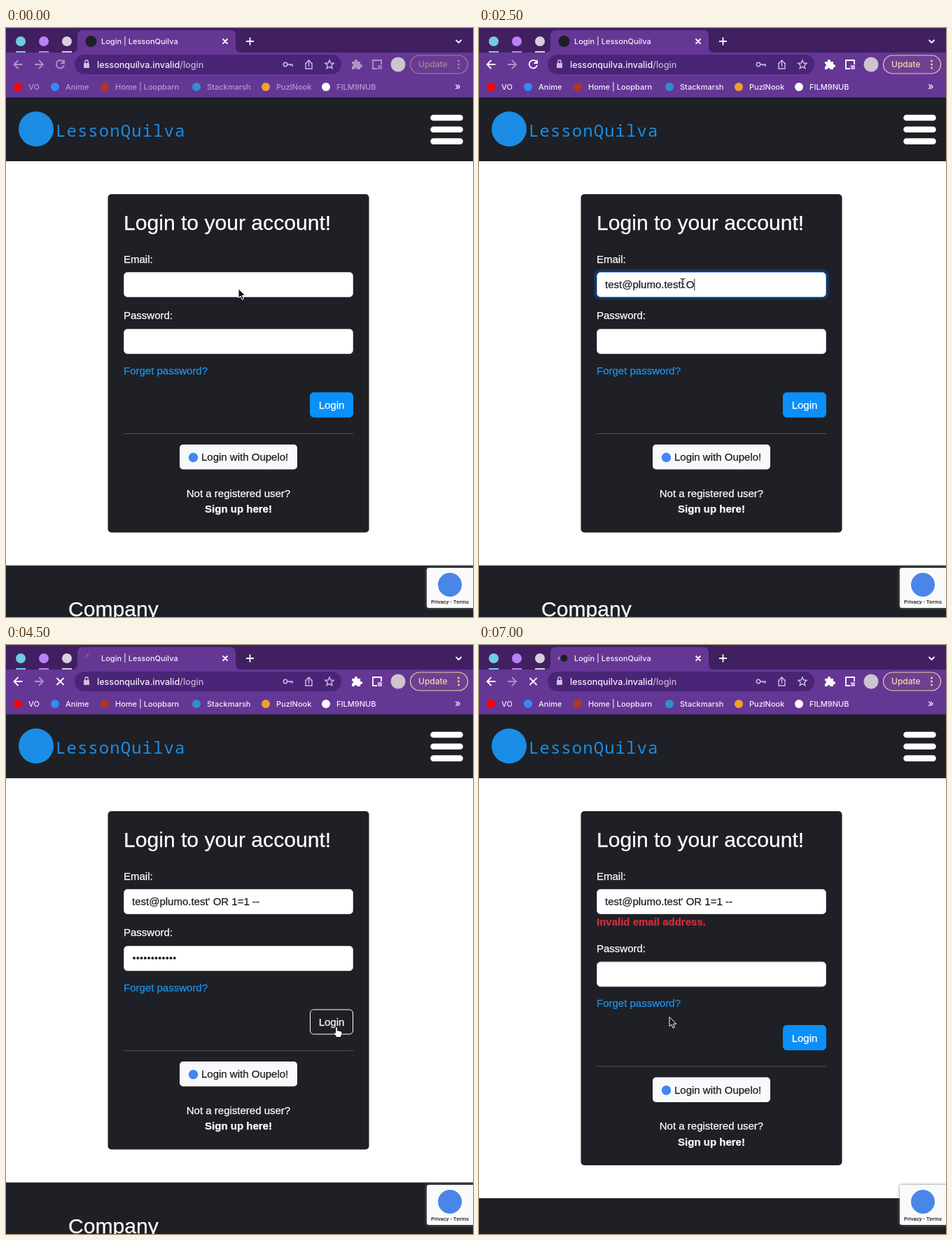
These frames come from a looping animation (667 px wide and 840 px high, 7100 ms). An HTML page:

```html
<!DOCTYPE html>
<html lang="en">
<head>
<meta charset="utf-8">
<title>Login</title>
<style>
  html, body { margin: 0; width: 100%; height: 100%; overflow: hidden; background: #fff; }
  #stage { position: relative; width: 667px; height: 840px; overflow: hidden; }
  svg { display: block; }
  text { white-space: pre; }
  .ui { font: 500 11px Inter, sans-serif; fill: #f4eefa; }
  .url { font-size: 12.6px; }
  .page { font: 15px "Liberation Sans", Arial, sans-serif; color: #fff; fill: currentColor; }
  .page text { stroke: currentColor; stroke-width: .25; }
  .page .big { font-size: 30.1px; }
  .bold { font-weight: 700; }
  .ink { color: #1b1d20; }
  .link { color: #1d93ee; }
  .error { color: #cf2e3f; }
  .mid { text-anchor: middle; }
  .brand { font: 500 24px "Noto Sans Mono", monospace; letter-spacing: 1.05px; fill: #1b8de4; }
  .dark { fill: #1e2025; }
  .line { fill: none; stroke: #fff; stroke-width: 1.8; }
  .soft { stroke: #d0bfe0; stroke-width: 1.4; }
  .field .box { fill: #fff; stroke: #c3c8ce; }
  .field .glow { fill: none; stroke: #1a345b; stroke-width: 3.8; }
  .field.on .box { stroke: #86b7fe; }
  #caret { stroke: #222; stroke-width: 1; }
  #badge {
    position: absolute; left: 601px; top: 770px; width: 70px; height: 57px;
    border-radius: 3px; box-shadow: 0 0 4px #808080;
  }
  #badge.full { background: #fafafa; }
  #badge:not(.full) > * { display: none; }
  #badge i { position: absolute; left: 16px; top: 7px; width: 34px; height: 34px; border-radius: 50%; background: #4a86e8; }
  #badge span {
    position: absolute; left: 0; top: 44px; width: 66px; text-align: center; white-space: nowrap;
    font: 500 7.8px/10px Roboto, sans-serif; color: #222;
  }
</style>
</head>
<body>
<div id="stage">
<svg width="667" height="840" viewBox="0 0 667 840">
  <rect width="667" height="840" fill="#fff"/>

  <!-- browser -->
  <rect width="667" height="36" fill="#402060"/>
  <rect y="35" width="667" height="65" fill="#643795"/>
  <path d="M94 35q8 0 8-8V11q0-8 8-8h210q8 0 8 8v16q0 8 8 8z" fill="#643795"/>
  <g id="lights"></g>
  <circle id="icon" cx="121.500" cy="19" fill="#1e2025"/>
  <circle id="spin" cx="120.500" cy="19" r="6.500" fill="none" pathLength="360"/>
  <text class="ui" x="136" y="23">Login | LessonQuilva</text>
  <path class="line" d="M309.500 15.500l7 7m0-7l-7 7M343 19h11m-5.500-5.500v11M642.500 17l4 4 4-4"/>

  <rect x="98" y="38" width="381" height="28" rx="14" fill="#4a2477"/>
  <g id="nav">
    <path class="line" d="M23.500 52H11.500m6-6l-6 6 6 6"/>
    <path id="reload" class="line" d="M82.200 48.500A5.700 5.700 0 1 0 83 53M83 45.500v4.500h-4.500"/>
    <path id="stop" class="line" d="M72.500 47l10 10m0-10l-10 10"/>
    <path d="M494 48h4a2.200 2.200 0 1 1 4 0h4v4a2.200 2.200 0 1 1 0 4v3h-4.500a2 2 0 0 0-4 0H494v-4a2 2 0 0 0 0-4z" fill="#fff"/>
    <path class="line" d="M536 52v-6h-12v12h6"/>
    <rect x="531" y="53" width="6" height="6" fill="#d9a4ee"/>
  </g>
  <path class="line" opacity=".45" d="M41 52h12m-6-6l6 6-6 6"/>
  <rect x="111" y="50" width="8" height="7" rx="1" fill="#d0bfe0"/>
  <path class="line soft" d="M112.800 50v-2a2.200 2.200 0 0 1 4.400 0v2"/>
  <text class="ui url" x="130" y="56.500">lessonquilva.invalid<tspan fill="#c3b0d6">/login</tspan></text>
  <g class="line soft">
    <circle cx="399" cy="52" r="2.700"/>
    <path d="M402 52h7v3m-3-3v2"/>
    <path d="M430 50h-2v8h9v-8h-2m-2.500 5v-9m-3 3l3-3 3 3"/>
    <path d="M462 46l1.800 4 4.300.4-3.300 2.900 1 4.300-3.800-2.300-3.800 2.300 1-4.300-3.300-2.900 4.300-.4z"/>
  </g>
  <circle cx="560" cy="52" r="10.500" fill="#cfc5cc"/>
  <g id="update">
    <rect x="577.500" y="39" width="82" height="26" rx="13" fill="#6d4092" stroke="#e9cf9f" stroke-width="1.200"/>
    <text class="ui" x="589" y="56.300" style="font-size:12px;fill:#f3d9a8">Update</text>
    <path d="M646.500 47v.01m0 5v.01m0 5v.01" stroke="#f3d9a8" stroke-width="2.800" stroke-linecap="round"/>
  </g>
  <g id="marks"></g>
  <text class="ui" x="641" y="87.500" style="font-size:14px">»</text>

  <!-- page header -->
  <rect class="dark" y="99" width="667" height="91"/>
  <circle cx="43" cy="144" r="25" fill="#1b8de4"/>
  <text class="brand" x="71" y="155">LessonQuilva</text>
  <path d="M610.500 128h38m-38 16.800h38m-38 16.800h38" stroke="#fff" stroke-width="8.600" stroke-linecap="round"/>

  <!-- login card -->
  <rect id="card" class="dark" x="145.500" y="237" width="373" rx="5"/>
  <g class="page">
    <text class="big" x="168" y="287.500">Login to your account!</text>
    <text x="168" y="334.500">Email:</text>
    <g id="email" class="field">
      <rect class="glow" x="166" y="346" width="332" height="39.500" rx="7"/>
      <rect class="box" x="168.500" y="348.500" width="327" height="35" rx="5"/>
      <text id="typed" class="ink" x="180" y="371"></text>
    </g>
    <text id="error" class="bold error" x="168" y="400">Invalid email address.</text>
    <g id="lower">
      <text x="168" y="415">Password:</text>
      <g id="pass" class="field">
        <rect class="glow" x="166" y="427" width="332" height="39.500" rx="7"/>
        <rect class="box" x="168.500" y="429.500" width="327" height="35" rx="5"/>
        <g id="dots" class="ink"></g>
      </g>
      <text class="link" x="168" y="493.500">Forget password?</text>
      <rect id="button" x="434.500" y="520" width="61" height="35" rx="5"/>
      <text class="mid" x="465" y="543">Login</text>
      <path d="M168 578.500h328" stroke="#505257"/>
      <rect x="248" y="594" width="168" height="35.500" rx="5" fill="#f8f9fa"/>
      <circle cx="267.500" cy="612.500" r="6.700" fill="#4285f4"/>
      <text class="ink" x="279" y="617">Login with Oupelo!</text>
      <text class="mid" x="332" y="668.500">Not a registered user?</text>
      <text class="mid bold" x="332" y="691">Sign up here!</text>
      <rect class="dark" y="766.500" width="667" height="90"/>
      <text class="big" x="89" y="839">Company</text>
    </g>
  </g>
  <path id="caret"/>

  <g id="pointer" stroke-linejoin="round" stroke-linecap="round">
    <path id="arrow" d="M0 0v13l3-2.800 2.200 5 2.300-1-2.200-4.800h4.200z" fill="#111" stroke="#fff"/>
    <g id="beam" fill="none">
      <path d="M-3-6.500q3 0 3 2v9q0 2-3 2M3-6.500q-3 0-3 2v9q0 2 3 2M-1.500 1h3" stroke="#fff" stroke-width="2.600"/>
      <path d="M-3-6.500q3 0 3 2v9q0 2-3 2M3-6.500q-3 0-3 2v9q0 2 3 2M-1.500 1h3" stroke="#111" stroke-width="1.200"/>
    </g>
    <path id="hand" d="M-1.500 8V1.200a1.500 1.500 0 0 1 3 0V5l1-.3 1.500.8 1.300-.2 1 .9 1.200.2.500 1.200v3l-1.500 2.400v1.500H.500L-3.500 9.800q-1.500-2 .3-2.300z" fill="#fff" stroke="#111"/>
  </g>
</svg>
<div id="badge"><i></i><span>Privacy - Terms</span></div>
</div>

<script>
const LOOP = 7100, STEP = 100;
const ACTIVE = 1600, TYPE = 1800, PASS = 2800, HOVER = 3900, CLICK = 4200, LOADING = 4400,
      RELOAD = 5000, ICON_BACK = 5700, BADGE_BOX = 6200, BADGE_FULL = 6600, LATE = 6700;
const EMAIL = "test@plumo.test' OR 1=1 --";
const SHIFT = 22.5, FADE = 200;

// time, x, y
const PATH = [
  [0, 332, 372], [500, 332, 372], [1400, 291, 364], [2900, 291, 364], [3300, 479, 496],
  [HOVER, 472, 545], [5300, 472, 545], [5700, 330, 400], [6000, 250, 392],
  [6300, 132, 333], [6600, 165, 400], [7000, 272, 531]
];
const SHAPES = [
  [0, "arrow"], [ACTIVE, "beam"], [3000, "arrow"], [HOVER, "hand"],
  [5400, "arrow"], [5600, "beam"], [6500, "arrow"]
];
// icon x, icon colour, label
const MARKS = [
  [17, "#f00", "VO"], [70, "#2f8df5", "Anime"], [141, "#b1361e", "Home | Loopbarn"],
  [272, "#2f8fd0", "Stackmarsh"], [371, "#f0a12b", "PuzlNook"], [457, "#fff", "FILM9NUB"]
];

const $ = id => document.getElementById(id);
const set = (id, attrs) => { for (const k in attrs) $(id).setAttribute(k, attrs[k]); };
const show = (id, on) => { $(id).style.display = on ? "" : "none"; };
const clamp = (v, lo, hi) => Math.max(lo, Math.min(hi, v));

$("lights").innerHTML = ["#70cce2", "#bb80f5", "#d6d0dc"].map((c, i) => {
  const x = 21 + 33 * i;
  return `<circle cx="${x}" cy="19" r="7" fill="${c}"/><path d="M${x - 7} 34h14" stroke="${c}" stroke-width="2"/>`;
}).join("");
$("marks").innerHTML = MARKS.map(([x, c, label]) =>
  `<circle cx="${x}" cy="84" r="6" fill="${c}"/><text class="ui" x="${x + 15}" y="87.5">${label}</text>`
).join("");
$("dots").innerHTML = Array.from({ length: 12 }, (_, i) =>
  `<circle cx="${183 + 5.25 * i}" cy="446.5" r="1.9"/>`).join("");

function pointAt(t) {
  const i = Math.max(1, PATH.findIndex(p => p[0] >= t));
  const [t0, x0, y0] = PATH[i - 1], [t1, x1, y1] = PATH[i];
  const u = (t - t0) / (t1 - t0), e = u * u * (3 - 2 * u);
  return [x0 + (x1 - x0) * e, y0 + (y1 - y0) * e];
}

function drawTab(t) {
  const loading = t >= LOADING;
  show("reload", !loading);
  show("stop", loading);
  show("icon", !loading || t >= ICON_BACK);
  set("icon", { r: loading ? 5 : 8 });
  show("spin", loading);
  if (!loading) return;
  const wait = t < RELOAD, late = t >= LATE;
  const arc = wait ? 55 : late ? 35 : t >= ICON_BACK ? 290 : 240;
  const turn = wait ? 195 - (t - 4500) * 0.36
    : late ? 165 + (t - 7000) * 0.36
    : 60 + (t - 5200) * 0.36;
  set("spin", {
    stroke: wait ? "#8f6bb5" : "#c58bd8",
    "stroke-width": wait ? 1.2 : 2.2,
    "stroke-dasharray": `${arc} ${360 - arc}`,
    transform: `rotate(${turn} 120.5 19)`
  });
}

function focus(id, t, from, to) {
  const on = t >= from && t < to, field = $(id);
  field.classList.toggle("on", on);
  field.querySelector(".glow").style.opacity = on ? clamp((t - from) / FADE, 0, 1) : 0;
  return on;
}

function drawForm(t) {
  const reloaded = t >= RELOAD;
  const chars = clamp(Math.floor((t - TYPE) / 38), 0, EMAIL.length);
  const dots = reloaded ? 0 : clamp(Math.floor((t - PASS) / 55), 0, 12);
  const onEmail = focus("email", t, ACTIVE, PASS), onPass = focus("pass", t, PASS, CLICK);
  const hover = t >= HOVER && !reloaded;

  $("typed").textContent = EMAIL.slice(0, chars);
  [...$("dots").children].forEach((d, i) => { d.style.display = i < dots ? "" : "none"; });

  show("caret", onEmail || onPass);
  const cx = onPass ? 180.5 + 5.25 * dots : 180.5 + (chars ? $("typed").getComputedTextLength() : 0);
  set("caret", { d: `M${cx} ${onPass ? 438 : 357.5}v17` });

  show("error", reloaded);
  set("lower", { transform: `translate(0 ${reloaded ? SHIFT : 0})` });
  set("card", { height: 482.5 + (reloaded ? SHIFT : 0) });
  set("button", { fill: hover ? "none" : "#0b8ff9", stroke: hover ? "#fff" : "#0b8ff9" });
}

function render(t) {
  const active = t >= ACTIVE;
  for (const id of ["nav", "update"]) set(id, { opacity: active ? 1 : 0.48 });
  for (const label of $("marks").querySelectorAll("text")) label.style.opacity = active ? 1 : 0.55;

  drawTab(t);
  drawForm(t);

  show("badge", t < RELOAD || t >= BADGE_BOX);
  $("badge").classList.toggle("full", t < RELOAD || t >= BADGE_FULL);

  const shape = SHAPES.filter(s => s[0] <= t).pop()[1];
  for (const id of ["arrow", "beam", "hand"]) show(id, id === shape);
  set("pointer", { transform: `translate(${pointAt(t)})` });
}

const start = performance.now();
function tick() {
  const t = (performance.now() - start) % LOOP;
  render(Math.floor(t / STEP) * STEP);
  requestAnimationFrame(tick);
}
tick();
</script>
</body>
</html>
```
